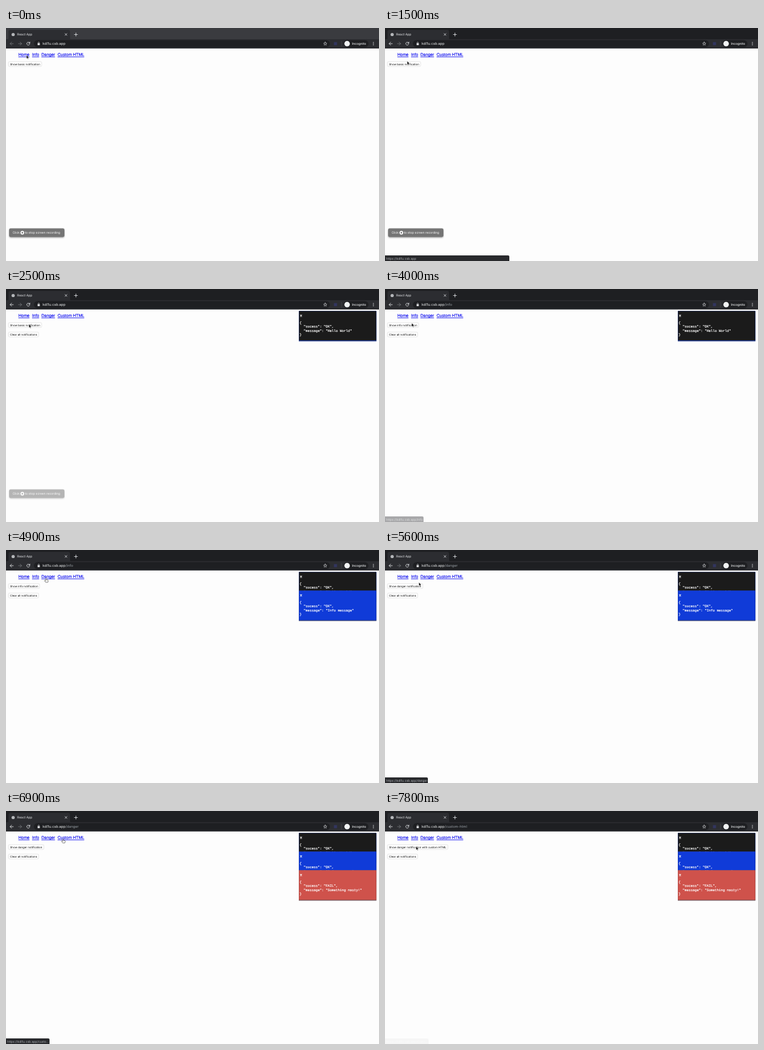
These frames come from a looping animation (600 by 375 pixels, 8000 ms). An HTML page:

```html
<!DOCTYPE html>
<html lang="en">
<head>
<meta charset="utf-8">
<title>Notifications demo</title>
<style>
  html, body { margin: 0; width: 100%; height: 100%; overflow: hidden; background: #fdfdfd; }
  svg { display: block; width: 600px; height: 375px; }
  text { font-family: Inter, Roboto, sans-serif; text-rendering: geometricPrecision; white-space: pre; }
  .nav text { font: 6.667px "Liberation Sans", Arial, sans-serif; fill: #00e; stroke: #00e; stroke-width: .14; text-decoration: underline; }
  .mono { font: 5.417px "Liberation Mono", "Courier New", monospace; fill: #fff; stroke: #fff; stroke-width: .16; }
  .line { fill: none; stroke: #e8eaed; stroke-width: .8; stroke-linecap: round; stroke-linejoin: round; }
  .button rect { fill: #fff; stroke: #c8c8c8; stroke-width: .45; }
  .button text { font-size: 4.4px; fill: #000; }
</style>
</head>
<body>
<svg viewBox="0 0 600 375">
  <defs>
    <filter id="shadow" x="-10%" y="-30%" width="120%" height="170%">
      <feDropShadow dx="0" dy="1" stdDeviation="1" flood-color="#000" flood-opacity=".35"/>
    </filter>
    <filter id="edge-shadow" x="-5%" y="-10%" width="110%" height="120%">
      <feDropShadow dx="0" dy=".4" stdDeviation=".5" flood-color="#1a2540" flood-opacity=".75"/>
    </filter>
  </defs>
  <rect width="600" height="375" fill="#fdfdfd"/>

  <g id="chrome">
    <rect id="strip" width="600" height="19"/>
    <path d="M1 19Q4 19 4 16V6Q4 3 7 3H100Q103 3 103 6V16Q103 19 106 19Z" fill="#2c2d31"/>
    <rect y="18" width="600" height="15" fill="#2c2d31"/>
    <circle cx="11.5" cy="10.5" r="2.6" fill="#b4b6b9"/>
    <text x="18" y="12.3" font-size="5" fill="#e8eaed">React App</text>
    <path class="line" d="M95 8.9l3 3m0-3l-3 3M110 10.5h5m-2.5-2.5v5"/>
    <path id="back" class="line" d="M11.8 25.2H6.6m2.5-2.5l-2.5 2.5 2.5 2.5"/>
    <path class="line" d="M20 25.2h5.2m-2.5-2.5l2.5 2.5-2.5 2.5" style="stroke:#77797d"/>
    <path class="line" d="M37.6 23.5a2.4 2.4 0 1 0 .6 2.3M38.4 22.6v1.8h-1.8"/>
    <rect x="45" y="19.6" width="476" height="11.4" rx="5.7" fill="#1e1f22"/>
    <rect x="50.8" y="24.4" width="3.6" height="3.2" rx=".4" fill="#e8eaed"/>
    <path class="line" d="M51.6 24.4v-.8a1 1 0 0 1 2 0v.8" style="stroke-width:.6"/>
    <text x="59" y="27.2" font-size="5.7" fill="#f1f3f4"><tspan>kdl1u.csb.app</tspan><tspan id="path" fill="#9aa0a6"></tspan></text>
    <path id="star" class="line" style="stroke-width:.6"/>
    <rect x="527.5" y="22.7" width="5" height="5" fill="#32365f"/>
    <path d="M539.5 21v8.5" stroke="#4b4d51" stroke-width=".5"/>
    <rect x="543" y="19.6" width="40" height="11.4" rx="5.7" fill="#1e1f22"/>
    <circle cx="548.7" cy="25.2" r="4.4" fill="#f1f3f4"/>
    <text x="556.6" y="27" font-size="5.1" font-weight="500" fill="#f1f3f4">Incognito</text>
    <g fill="#e8eaed"><circle cx="591" cy="23.2" r=".65"/><circle cx="591" cy="25.2" r=".65"/><circle cx="591" cy="27.2" r=".65"/></g>
  </g>

  <g class="nav">
    <text x="20" y="45.3">Home</text>
    <text x="42" y="45.3">Info</text>
    <text x="57" y="45.3">Danger</text>
    <text x="83" y="45.3">Custom HTML</text>
  </g>
  <g id="show" class="button"><rect x="4" y="54.2" height="7.6" rx="1.6"/><text x="6.5" y="59.5"></text></g>
  <g id="clear" class="button"><rect x="4" y="69.4" height="7.6" rx="1.6"/><text x="6.5" y="74.7"></text></g>

  <g id="notices"></g>

  <g id="toast">
    <rect x="5" y="322.5" width="89" height="14" rx="2.4" fill="#747474" filter="url(#shadow)"/>
    <g font-size="4.9" fill="#fff">
      <text x="10.5" y="331.3">Click</text>
      <circle cx="26.3" cy="329.5" r="3"/>
      <rect x="25.2" y="328.4" width="2.2" height="2.2" rx=".4" fill="#555"/>
      <text x="30.5" y="331.3">to stop screen recording</text>
    </g>
  </g>

  <g id="status">
    <path fill="#292a2d"/>
    <text x="2" y="372.6" font-size="4.9" fill="#b0b3b8"></text>
  </g>

  <g id="cursor" stroke="#fff" stroke-width=".5" stroke-linejoin="round">
    <path id="arrow" d="M0 0V5.8L1.3 4.6 2.2 6.6 3.2 6.2 2.3 4.2H4.1Z" fill="#000"/>
    <path id="hand" d="M-.8 .5Q0-.5 .6 .5V2.4L2.9 2.9Q3.5 3.1 3.3 4L2.7 6.4H-.8L-2.7 3.9Q-2.5 2.9-1.6 3.4L-.8 4Z" fill="#fff" stroke="#111"/>
  </g>
</svg>

<script>
const LOOP = 8000;
const NS = "http://www.w3.org/2000/svg";
const $ = id => document.getElementById(id);
const clamp = v => Math.max(0, Math.min(1, v));
const ramp = (t, from, to) => clamp((t - from) / (to - from));
const ease = p => p * p * (3 - 2 * p);

// Each page takes over at its start time.
const pages = [
  { at: 0, path: "", label: "Show basic notification" },
  { at: 3500, path: "/info", label: "Show info notification" },
  { at: 5300, path: "/danger", label: "Show danger notification" },
  { at: 7200, path: "/custom-html", label: "Show danger notification with custom HTML" }
];

const notices = [
  { at: 2000, color: "#1b1b1b", edge: "#1c3fb4", result: "OK", message: "Hello World" },
  { at: 4400, color: "#103bd8", edge: "#2a3c86", result: "OK", message: "Info message" },
  { at: 6000, color: "#cf524b", edge: "#8b5552", result: "FAIL", message: "Something nasty!" }
];

// Link previews: shown, fading from `out` until `end`.
const previews = [
  { at: 900, out: 1550, end: 1750, width: 200, path: "" },
  { at: 3300, out: 3850, end: 4100, width: 62, path: "/info" },
  { at: 5100, out: 5600, end: 5850, width: 69, path: "/danger" },
  { at: 6750, out: 7500, end: 7810, width: 70, path: "/custo…" }
];

// Pointer stops: time, x, y.
const stops = [
  [0, 33, 43.6], [100, 33, 43.6], [200, 32, 44], [800, 32, 44], [1200, 35.7, 53.2],
  [1500, 35.7, 53.2], [1900, 37, 56.6], [2500, 37, 56.6], [3150, 46, 44.8],
  [3550, 46, 44.8], [4000, 43, 54.8], [4250, 42.5, 56.8], [4500, 42.5, 56.8],
  [4900, 64.6, 45.6], [5350, 65, 45], [5800, 47, 57], [6150, 47, 57],
  [6750, 92, 45], [7250, 92, 45], [7700, 50.5, 56.5], [7800, 50, 57], [8000, 50, 57]
];
const links = [[20, 38], [42, 53], [57, 79], [83, 126]];

function add(parent, name, attrs, text = "") {
  const el = document.createElementNS(NS, name);
  for (const key in attrs) el.setAttribute(key, attrs[key]);
  el.textContent = text;
  return parent.appendChild(el);
}

function setButton(button, label) {
  const [box, text] = button.children;
  if (text.textContent === label) return;
  text.textContent = label;
  box.setAttribute("width", text.getComputedTextLength() + 5);
}

function buildNotice(notice, i) {
  const g = add($("notices"), "g", { transform: `translate(471 ${35.4 + 30 * i})` });
  add(g, "rect", { width: 124.8, height: 48.4, fill: notice.edge, filter: "url(#edge-shadow)" });
  add(g, "rect", { x: .3, width: 124.3, height: 47.4, fill: notice.color });
  add(g, "path", { d: "M2.2 6.3l2.8 2.8m0-2.8l-2.8 2.8", stroke: "#fff", "stroke-width": 1.2 });
  const lines = ["{", `  "sucess": "${notice.result}",`, `  "message": "${notice.message}"`, "}"];
  lines.forEach((line, n) => add(g, "text", { class: "mono", x: 1.2, y: 20.8 + 6.22 * n }, line));
  notice.el = g;
}

function pointerAt(t) {
  const i = stops.findIndex(s => s[0] > t);
  const [t0, x0, y0] = stops[i - 1], [t1, x1, y1] = stops[i];
  const p = ease(ramp(t, t0, t1));
  return [x0 + (x1 - x0) * p, y0 + (y1 - y0) * p];
}

function draw(t) {
  const page = pages.filter(p => p.at <= t).pop();
  $("path").textContent = page.path;
  setButton($("show"), page.label);
  $("clear").style.opacity = t >= notices[0].at ? 1 : 0;
  notices.forEach(n => n.el.style.display = t >= n.at ? "" : "none");

  const focused = t >= 800;
  $("strip").setAttribute("fill", focused ? "#1e1f22" : "#3a3b3f");
  $("back").style.stroke = t >= 1000 ? "#e8eaed" : "#77797d";
  $("toast").style.opacity = 1 - ramp(t, 2300, 2720);

  const preview = previews.find(p => t >= p.at && t < p.end);
  $("status").style.opacity = preview ? ramp(t, preview.at - 60, preview.at + 140) * (1 - ramp(t, preview.out, preview.end)) : 0;
  if (preview) {
    const [bubble, text] = $("status").children;
    bubble.setAttribute("d", `M0 366H${preview.width - 2}q2 0 2 2V375H0Z`);
    text.textContent = "https://kdl1u.csb.app" + preview.path;
  }

  const [x, y] = pointerAt(t);
  const overLink = t >= 150 && y < 47 && links.some(([a, b]) => x >= a && x <= b);
  $("cursor").setAttribute("transform", `translate(${x} ${y})`);
  $("hand").style.display = overLink ? "" : "none";
  $("arrow").style.display = overLink ? "none" : "";
}

const starPoints = Array.from({ length: 10 }, (_, i) => {
  const r = i % 2 ? 1.3 : 2.8, a = i * Math.PI / 5;
  return `${513.5 + r * Math.sin(a)} ${25.3 - r * Math.cos(a)}`;
});
$("star").setAttribute("d", `M${starPoints.join("L")}Z`);
notices.forEach(buildNotice);
setButton($("clear"), "Clear all notifications");

const start = performance.now();
function tick() {
  draw((performance.now() - start) % LOOP);
  requestAnimationFrame(tick);
}
tick();
</script>
</body>
</html>
```
